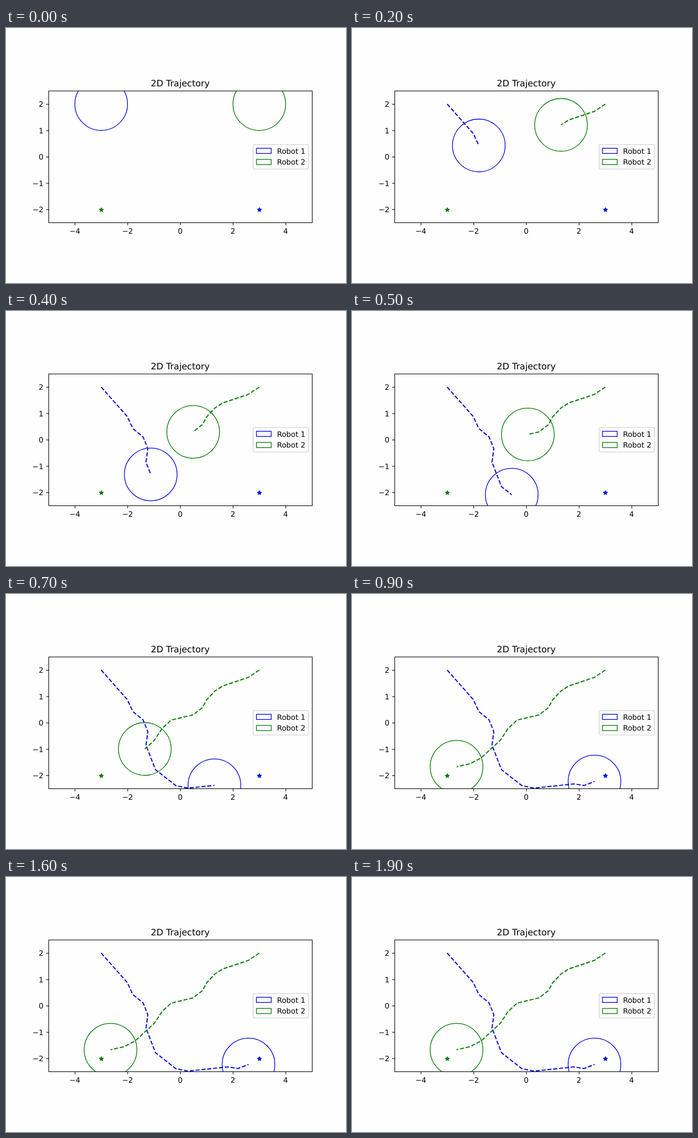
Recreate the animation shown at these times as an HTML page. Size 600 px wide and 450 px high, loop 2 s.

```html
<!DOCTYPE html>
<html lang="en">
<head>
<meta charset="utf-8">
<title>2D Trajectory</title>
<style>
  html, body { margin: 0; width: 100%; height: 100%; overflow: hidden; background: #fefefe; }
  svg { display: block; width: 600px; height: 450px; }
  text { font: 13.02px "DejaVu Sans", sans-serif; text-rendering: geometricPrecision; }
  .title { font-size: 15.625px; }
  .axes { fill: none; stroke: #000; stroke-width: 1.04; }
  .outline { fill: none; stroke-width: 1.3; }
  .trail { fill: none; stroke-width: 1.95; stroke-dasharray: 7.23 3.125; stroke-linejoin: round; }
</style>
</head>
<body>
<svg id="stage" viewBox="0 0 600 450">
  <clipPath id="plotArea"><rect x="75" y="111" width="465" height="232.5"/></clipPath>
</svg>
<script>
const UNIT = 46.5, FRAME_MS = 100, LOOP_MS = 2000, STEPS_PER_FRAME = 2;
const stage = document.getElementById('stage');
const px = x => 307.5 + UNIT * x;
const py = y => 227.25 - UNIT * y;

function add(tag, attrs, parent = stage, text = '') {
  const node = document.createElementNS('http://www.w3.org/2000/svg', tag);
  for (const key in attrs) node.setAttribute(key, attrs[key]);
  node.textContent = text;
  return parent.appendChild(node);
}

function label(x, y, anchor, text, cls = '') {
  add('text', { x, y, 'text-anchor': anchor, class: cls }, stage, text);
}

// Corners in plot units: [x, y, steps taken to get there (default 1)]
const robots = [
  { name: 'Robot 1', color: '#0808dc', goal: [3, -2], corners: [
    [-3, 2], [-2.01, 0.88, 3], [-1.8, 0.43], [-1.41, 0.11], [-1.23, -0.34], [-1.3, -0.85],
    [-0.94, -1.78, 2], [-0.16, -2.39, 2], [0.29, -2.48], [1.8, -2.32, 3], [2.2, -2.38], [2.59, -2.23]] },
  { name: 'Robot 2', color: '#087c08', goal: [-3, -2], corners: [
    [3, 2], [2.58, 1.72], [1.62, 1.4, 2], [1.32, 1.21], [1, 0.87], [0.845, 0.58], [0.49, 0.3, 2],
    [0.06, 0.2, 2], [-0.35, 0.1], [-0.7, -0.23], [-0.98, -0.66], [-1.71, -1.33, 2], [-2.12, -1.55], [-2.645, -1.67]] }
];

// Stage position after every step, evenly spaced between corners
function walk(corners) {
  let [x, y] = corners[0];
  const points = [[px(x), py(y)]];
  for (const [toX, toY, steps = 1] of corners.slice(1)) {
    for (let i = 1; i <= steps; i++) {
      points.push([px(x + (toX - x) * i / steps), py(y + (toY - y) * i / steps)]);
    }
    [x, y] = [toX, toY];
  }
  return points;
}

function starPoints(cx, cy, radius) {
  return Array.from({ length: 10 }, (_, i) => {
    const r = i % 2 ? radius * 0.382 : radius, a = i * Math.PI / 5;
    return [cx + r * Math.sin(a), cy - r * Math.cos(a)];
  }).join(' ');
}

const plot = add('g', { 'clip-path': 'url(#plotArea)' });
for (const robot of robots) {
  robot.path = walk(robot.corners);
  robot.body = add('circle', { r: UNIT, class: 'outline', stroke: robot.color }, plot);
}
for (const robot of robots) {
  const [x, y] = robot.goal;
  robot.trail = add('polyline', { class: 'trail', stroke: robot.color }, plot);
  add('polygon', { points: starPoints(px(x) + 0.2, py(y) + 0.6, 3.9), fill: robot.color,
    stroke: robot.color, 'stroke-width': 1.3, 'stroke-linejoin': 'bevel' }, plot);
}

const signed = n => String(n).replace('-', '\u2212');
add('rect', { x: 75.4, y: 111.1, width: 465, height: 232.5, class: 'axes' });
for (let n = -4; n <= 4; n += 2) {
  add('path', { d: `M${px(n) + 0.3} 343.6v4.6`, class: 'axes' });
  label(px(n), 362.6, 'middle', signed(n));
}
for (let n = -2; n <= 2; n++) {
  add('path', { d: `M75.4 ${py(n) + 0.3}h-4.6`, class: 'axes' });
  label(66, py(n) + 5, 'end', signed(n));
}
label(307.5, 103.2, 'middle', '2D Trajectory', 'title');

add('rect', { x: 436.2, y: 205.6, width: 97.5, height: 43.2, rx: 2.6,
  fill: '#fefefe', 'fill-opacity': 0.8, stroke: '#ccc', 'stroke-opacity': 0.8, 'stroke-width': 1.3 });
robots.forEach((robot, i) => {
  const y = 212.3 + 19.6 * i;
  add('rect', { x: 442, y, width: 26, height: 9.1, class: 'outline', stroke: robot.color });
  label(478.2, y + 9.2, 'start', robot.name);
});

function draw(time) {
  const step = STEPS_PER_FRAME * Math.floor(time % LOOP_MS / FRAME_MS);
  for (const { path, body, trail } of robots) {
    const last = Math.min(step, path.length - 1);
    body.setAttribute('cx', path[last][0]);
    body.setAttribute('cy', path[last][1]);
    trail.setAttribute('points', path.slice(0, last + 1).join(' '));
  }
}

const start = performance.now();
function tick() {
  draw(performance.now() - start);
  requestAnimationFrame(tick);
}
tick();
</script>
</body>
</html>
```
